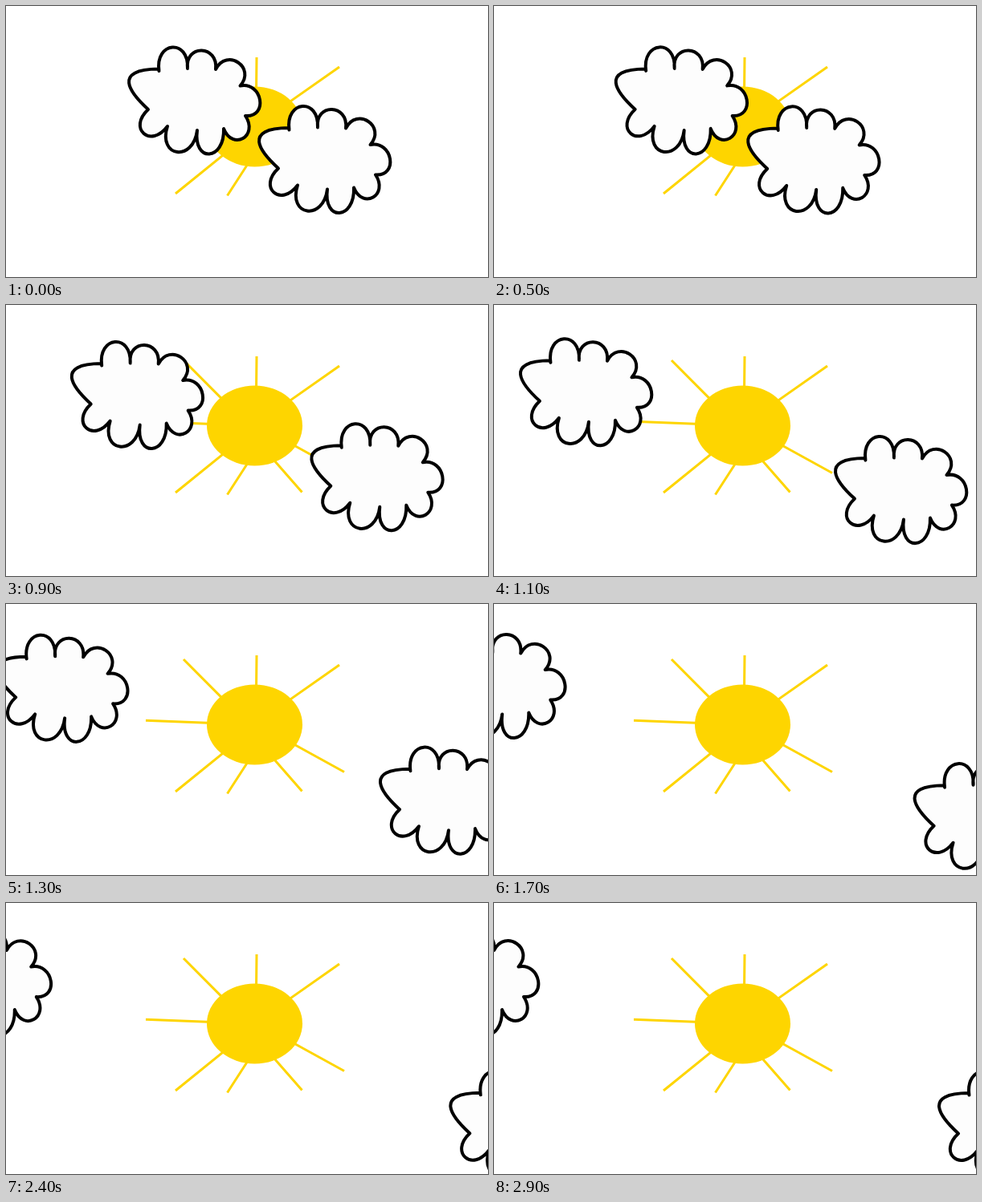
Animation of 600x338 px, one loop 4200 ms. Source, as an HTML page with a canvas:

```html
<!DOCTYPE html>
<html lang="en">
<head>
<meta charset="utf-8">
<title>Sun and clouds</title>
<style>
html, body { margin: 0; width: 100%; height: 100%; overflow: hidden; background: #fff; }
canvas { display: block; }
</style>
</head>
<body>
<canvas id="sky" width="600" height="338"></canvas>
<script>
const ctx = document.getElementById('sky').getContext('2d');
const LOOP = 4200, STEP = 100, START = 450, LENGTH = 2370;
const YELLOW = '#fed500';
const SUN = { x: 309.5, y: 150.5, rx: 59.5, ry: 50 };

// Ray tips, and where each ray would cross the sun's middle line.
const rays = [
  [312, 64, 311], [415, 76, 309], [421, 209.5, 314], [368.5, 233.5, 296],
  [275.5, 236.5, 331], [211, 234, 314], [174, 145.2, 310], [221, 69, 302]
];

// Puffs clockwise: starting corner, then the top of the bulge.
const puffs = [
  [190.5, 81, 207, 51.5], [226, 78, 243.5, 55.5], [261, 79, 289, 70.5],
  [291.5, 99.5, 316, 117], [298, 137, 295, 165], [271, 153, 253, 184.5],
  [238, 155, 213, 182], [201, 150, 171.5, 159]
];
const TAIL = [177, 129];

function makeCloud() {
  const path = new Path2D();
  path.moveTo(puffs[0][0], puffs[0][1]);
  puffs.forEach(([ax, ay, topX, topY], i) => {
    const [bx, by] = puffs[i + 1] || TAIL;
    // Handles lie parallel to the chord, so the curve peaks at the top.
    const mx = (8 * topX - ax - bx) / 6, my = (8 * topY - ay - by) / 6;
    const wx = 0.6 * (bx - ax), wy = 0.6 * (by - ay);
    path.bezierCurveTo(mx - wx, my - wy, mx + wx, my + wy, bx, by);
  });
  path.bezierCurveTo(154, 108, 132, 79, 190, 78.5);
  path.closePath();
  return path;
}
const cloud = makeCloud();

// Ease-out time fed through a smooth step.
function drift(t) {
  const x = Math.max(0, Math.min(1, (t - START) / LENGTH));
  const u = 1 - (1 - x) ** 2;
  return u * u * (3 - 2 * u);
}

function drawSun() {
  ctx.strokeStyle = ctx.fillStyle = YELLOW;
  ctx.lineWidth = 3;
  ctx.beginPath();
  for (const [x, y, aim] of rays) {
    ctx.moveTo(x, y);
    ctx.lineTo((x + 3 * aim) / 4, (y + 3 * SUN.y) / 4);
  }
  ctx.stroke();
  ctx.beginPath();
  ctx.ellipse(SUN.x, SUN.y, SUN.rx, SUN.ry, 0, 0, 2 * Math.PI);
  ctx.fill();
}

function drawCloud(x, y) {
  ctx.save();
  ctx.translate(x, y);
  ctx.lineJoin = 'round';
  ctx.lineWidth = 4;
  ctx.strokeStyle = '#000';
  ctx.fillStyle = '#fdfdfd';
  ctx.fill(cloud);
  ctx.stroke(cloud);
  ctx.restore();
}

function draw(t) {
  const p = drift(Math.floor(t / STEP) * STEP);
  ctx.fillStyle = '#fff';
  ctx.fillRect(0, 0, 600, 338);
  drawSun();
  drawCloud(-261 * p, -20 * p);
  drawCloud(162 + 239 * p, 73.5 + 85 * p);
}

const start = performance.now();
function tick() {
  draw((performance.now() - start) % LOOP);
  requestAnimationFrame(tick);
}
tick();
</script>
</body>
</html>
```
